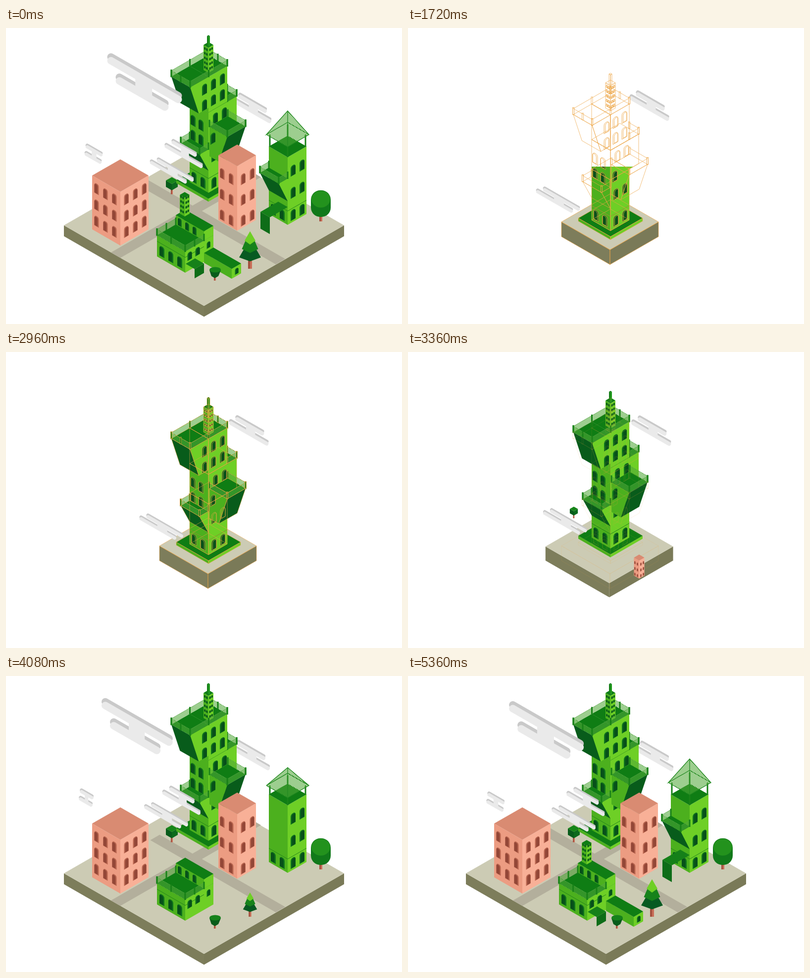
Animation of 800x600 px, one loop 5400 ms. Source, as an HTML page with a canvas:

```html
<!DOCTYPE html>
<html lang="en">
<head>
<meta charset="utf-8">
<title>Isometric city</title>
<style>
html, body { margin: 0; width: 100%; height: 100%; overflow: hidden; background: #fff; }
canvas { display: block; }
</style>
</head>
<body>
<canvas id="stage" width="800" height="600"></canvas>
<script>
const c = document.getElementById('stage').getContext('2d');
const LOOP = 5400, CUT = 640, K = 0.577, SIDES = [-1, 1];
const ROOF = '#0f7d14', DARK = '#085c1b', SEAM = '#23841a', LEAF = '#16821b';
const GREEN = [ROOF, '#4cb01e', '#6ecf26'];
const PINK = ['#d98b72', '#ec9c82', '#f8b097'];
const SAND = ['#cccbb4', '#7d7d5b', '#7a7a58'];
const GREEN_WIN = ['#10741c', '#07501a'], PINK_WIN = ['#b96650', '#934737'];
let now = 0, wire = false, winScale = 1;

const clamp = x => Math.max(0, Math.min(1, x));
const mix = (a, b, k) => a + (b - a) * k;
const lin = (start, span) => clamp((now - start) / span);
const out = (start, span) => 1 - (1 - lin(start, span)) ** 3;
const inOut = (start, span) => {
  const x = lin(start, span);
  return x < 0.5 ? 4 * x ** 3 : 1 - 4 * (1 - x) ** 3;
};

// Points are [x, y]. Side -1 is the left axis, 1 the right one.
const back = ([x, y], side, d) => [x + side * d, y - K * d];
const fore = ([x, y], side, d) => [x + side * d, y + K * d];
const up = ([x, y], h) => [x, y - h];
const rhomb = ([x, y], r) => [[x - r, y], [x, y + K * r], [x + r, y], [x, y - K * r]];

// Fine mesh used for railings and the glass roof
const mesh = (() => {
  const tile = document.createElement('canvas');
  tile.width = tile.height = 3;
  const g = tile.getContext('2d');
  g.fillStyle = 'rgba(90,175,60,.35)';
  g.fillRect(0, 0, 3, 3);
  g.fillStyle = '#4ca437';
  for (let i = 0; i < 3; i++) g.fillRect(i, i, 1, 1);
  return c.createPattern(tile, 'repeat');
})();

function paint(col) {
  if (wire) return c.stroke();
  c.fillStyle = col;
  c.fill();
}

function trace(pts) {
  c.beginPath();
  for (const p of pts) c.lineTo(...p);
}

function poly(col, ...pts) {
  trace(pts);
  c.closePath();
  paint(col);
}

function line(col, width, ...pts) {
  trace(pts);
  if (!wire) { c.strokeStyle = col; c.lineWidth = width; }
  c.stroke();
}

function oval(col, x, y, rx, ry) {
  c.fillStyle = col;
  c.beginPath();
  c.ellipse(x, y, rx, ry, 0, 0, 7);
  c.fill();
}

// Block standing on its front bottom corner p
function box(p, l, r, h, cols) {
  const top = up(p, h);
  for (const [side, len, col] of [[-1, l, cols[1]], [1, r, cols[2]]])
    poly(col, p, back(p, side, len), back(top, side, len), top);
  poly(cols[0], top, back(top, -1, l), back(back(top, -1, l), 1, r), back(top, 1, r));
}

function seam(p, l, r) { line(SEAM, 1, back(p, -1, l), p, back(p, 1, r)); }

function arch(a, h, w, ht, col) {
  const spring = h + ht - w / 2;
  c.beginPath();
  c.moveTo(a - w / 2, h);
  c.arc(a, spring, w / 2, Math.PI, 0, true);
  c.lineTo(a + w / 2, h);
  c.closePath();
  paint(col);
}

// Even grid of windows on the face that leaves corner p on one side
function wins(p, side, { at = 11, gap = 18, n = 2, low = 4, step = 32, rows = 1, w = 10, h = 21, cols = GREEN_WIN }) {
  if (winScale <= 0) return;
  c.save();
  c.transform(side, -K, 0, -1, ...p);
  const sw = w * winScale, sh = h * winScale;
  for (let i = 0; i < n; i++) for (let j = 0; j < rows; j++) {
    const a = at + gap * i, y = low + step * j;
    arch(a, y, sw, sh, cols[0]);
    arch(a + sw * 0.13, y + sh * 0.04, sw * 0.74, sh * 0.86, cols[1]);
  }
  c.restore();
}

function post([x, y], h) {
  if (wire) return c.strokeRect(x - 1.5, y - h, 3, h);
  c.fillStyle = '#198218';
  c.fillRect(x - 1.5, y - h, 3, h + 1);
}

// Railing along a path, each stretch split into n parts by posts
function fence(n, ...pts) {
  for (let i = 1; i < pts.length; i++) {
    const a = pts[i - 1], b = pts[i];
    if (!wire) poly(mesh, a, b, up(b, 12), up(a, 12));
    line('#55a544', 0.8, up(a, 12), up(b, 12));
    for (let j = 0; j <= n; j++) post([mix(a[0], b[0], j / n), mix(a[1], b[1], j / n)], 14);
  }
}

// Part leaning out of a wall; its underside reaches out by the taper share
function lean(p, side, len, reach, h, taper, k) {
  if (k <= 0) return;
  const e = reach * k, q = back(p, side, len), p2 = fore(p, side, e), q2 = fore(q, side, e);
  const foot = up(p, -h), p3 = fore(foot, side, taper * e), q3 = back(p3, side, len);
  poly(side < 0 ? GREEN[2] : GREEN[1], p, p2, p3, foot);
  poly(DARK, p2, q2, q3, p3);
  poly(ROOF, p, p2, q2, q);
}

function railing(p, side, len, reach, k) {
  const q = back(p, side, len);
  if (k > 0.95) fence(1, q, fore(q, side, reach), fore(p, side, reach), p);
}

function balcony(p, side, len, reach, h, taper, k) {
  lean(p, side, len, reach, h, taper, k);
  railing(p, side, len, reach, k);
}

// Flat roof with a hanging front panel
function awning(p, side, e, h) {
  if (e <= 0) return;
  const q = back(p, side, 19), p2 = fore(p, side, e), q2 = fore(q, side, e);
  poly('#158019', p, q, q2, p2);
  poly('#0e6d18', p2, q2, up(q2, -h), up(p2, -h));
}

function spire(p, h, rows) {
  box(p, 10, 10, h, GREEN);
  for (const s of SIDES) wins(p, s, { at: 3, gap: 4, low: 5, step: 9.5, rows, w: 3, h: 5 });
}

function slab() { box([409, 352], 65, 65, 6, GREEN); }

function tower(kLow, kTop, kRight, kMast) {
  const foot = [409, 334], mid = [409, 231], neck = [409, 171], top = [409, 99];
  box(foot, 38, 38, 103, GREEN);
  seam(up(foot, 29), 38, 38);
  wins(foot, -1, {});
  wins(foot, 1, { step: 54, rows: 2 });

  box(mid, 38, 57, 60, GREEN);
  seam(neck, 0, 57);
  const edge = back(neck, 1, 38), corner = back(neck, 1, 57);
  fence(1, edge, corner, back(corner, -1, 19));
  wins(mid, -1, { at: 15, gap: 16, low: -15, step: 30, rows: 2 });
  wins(mid, 1, { at: 14, low: 30 });
  balcony([409, 246], -1, 38, 18, 43, 0, kLow);
  balcony([411, 200], 1, 37, 36, 60, 0.53, kRight);
  wins(mid, 1, { at: 9, n: 1, low: -8 });

  // Top storeys under the roof terrace
  box(neck, 38, 38, 72, GREEN);
  lean(top, -1, 38, 37, 63, 0.53, kTop);
  wins([409, 162], 1, { at: -8, n: 3, low: 0, rows: 2 });
  const e = 37 * kTop, front = fore(top, -1, e), left = back(front, -1, 38), right = back(top, 1, 38);
  fence(2, left, [409, 55], right);
  spire([409, 91], 51, 5);
  if (kMast > 0) box([409, 38], 3, 3, 20 * kMast, [ROOF, '#168018', '#1f9a1c']);
  fence(2, left, front, right);
}

// Grows a drawing from its foot point
function pop(k, x, y, draw) {
  if (k <= 0) return;
  c.save();
  c.translate(x, y);
  c.scale(k, k);
  c.translate(-x, -y);
  draw();
  c.restore();
}

function pinkBlock(p, size, h, grid) {
  box(p, size, size, h, PINK);
  for (const s of SIDES) wins(p, s, { at: 12, rows: 3, w: 9, cols: PINK_WIN, ...grid });
}

const pinkSlim = () => pinkBlock([467, 411], 38, 131, { step: 42 });
const pinkWide = () => pinkBlock([231, 441], 57, 109, { n: 3, low: 11, step: 33 });

function lookout() {
  const p = [569, 399];
  box(p, 38, 38, mix(78, 137, out(3500, 420)), GREEN);
  seam(up(p, 28), 38, 38);
  winScale = out(3670, 400);
  wins(p, 1, { step: 45, rows: 3 });
  wins(p, -1, {});
  winScale = 1;
  balcony([569, 305], -1, 38, 18, 46, 0, out(4564, 400));
  awning([569, 363], -1, 36 * out(4450, 500), 34);

  const k = out(3950, 350);
  if (k <= 0) return;
  for (const q of rhomb([569, 240], 36)) post(q, 24 * k);
  const y = 240 - 24 * k, tip = [569, y - 48 * k], [l, f, r, b] = rhomb([569, y], 43);
  poly(mesh, l, f, r, tip);
  line('#238a22', 1.3, l, f, r, tip, l, b, r);
  line('#238a22', 1.3, f, tip);
}

function house() {
  const p = [362, 496], roof = up(p, 43);
  box(p, 57, 57, 43, GREEN);
  seam(up(p, 31), 57, 38);
  wins(p, -1, { n: 3, low: 5 });
  wins(p, 1, { at: 9, gap: 16, low: 21, w: 9, h: 16 });
  wins(p, 1, { at: 47, n: 1, low: 23, w: 7, h: 13 });

  const k = out(3730, 380), wing = back(roof, 1, 38);
  if (k > 0) {
    box(wing, 57, 19, 19 * k, GREEN);
    winScale = k;
    wins(wing, -1, { at: 19, gap: 15, n: 3, low: 1, w: 8, h: 16 });
    winScale = 1;
  }
  const rise = 38 * out(4490, 300);
  if (rise > 0) spire([361, 382], rise, Math.floor(rise / 9.5));
  if (now > 3950) fence(2, back(wing, -1, 57), back(roof, -1, 57), roof, wing);
  awning([363, 478], 1, 18 * out(4150, 350), 19);
}

function annex() {
  const len = 56 * out(4620, 400);
  if (len <= 0) return;
  const p = fore([400, 476], 1, len);
  box(p, len, 19, 20, GREEN);
  wins(p, 1, { at: 10, n: 1, w: 7, h: 12 });
}

function trunk(x, y, w, h) {
  c.fillStyle = '#c96f59';
  c.fillRect(x - w / 2, y - h, w, h);
  c.fillStyle = '#a4503f';
  c.fillRect(x - w / 2, y - h, w / 2, h);
}

function cubeTree() {
  trunk(335, 337, 4, 14);
  box([335, 329], 12, 12, 13, ['#168519', DARK, '#0c6a1d']);
}

function roundTree() {
  trunk(636, 392, 6, 16);
  c.fillStyle = '#11791a';
  c.beginPath();
  c.roundRect(616, 329, 40, 54, 19);
  c.fill();
  oval('#23921d', 636, 347, 19, 17);
}

function pine() {
  const x = 493;
  trunk(x, 488, 8, 18);
  ['#075a22', LEAF, '#6ecf26'].forEach((col, i) => {
    const y = 473 - 17 * i, w = 22 - 5.5 * i, n = i < 2 ? w / 2 : 0;
    poly(col, [x - n, y - 27], [x + n, y - 27], [x + w, y - 8], [x, y], [x - w, y - 8]);
  });
}

function bush() {
  trunk(422, 512, 4, 10);
  poly(DARK, [411, 491], [434, 491], [429, 503], [422, 507], [415, 503]);
  oval(LEAF, 422.5, 490, 11.5, 5.5);
}

// Strip of road that starts at the plate's edge and runs away along one axis
function road(p, side, len) {
  const q = back(p, -side, 19);
  if (len > 0) poly('#b3af9c', p, q, back(q, side, len), back(p, side, len));
}

// Two strips along the right-down axis, joined in the middle of their overlap
function cloud(k, speed, dy, w, upper, lower) {
  if (k <= 0) return;
  const s = (now - LOOP) / 1000 * speed;
  const strips = [upper, lower].map(([x, y, len]) => ({ p: [x, y], len: len * k }));
  const at = (strip, x) => fore(strip.p, 1, x - strip.p[0]);
  const start = Math.max(...strips.map(t => t.p[0]));
  const end = Math.min(...strips.map(t => t.p[0] + t.len));
  const a = mix(start, end, 0.35), b = mix(start, end, 0.72);
  c.save();
  c.translate(s, s * 0.56 + dy);
  c.lineCap = 'round';
  for (const [shift, col] of [[-0.22, '#c9c9c9'], [0.28, '#eaeaea']]) {
    c.save();
    c.translate(0, shift * w);
    for (const t of strips) line(col, w, t.p, fore(t.p, 1, t.len));
    if (shift > 0) poly(col, at(strips[0], a), at(strips[0], b), at(strips[1], b), at(strips[1], a));
    c.restore();
  }
  c.restore();
}

function base(p, grow) {
  const w = mix(98, 283, p) * grow, h = mix(30, 22, p);
  box([mix(408, 400, p), mix(393, 400, p) + K * w + h], w, w, h, SAND);
}

function wires(alpha, k) {
  c.save();
  c.globalAlpha = alpha;
  c.strokeStyle = '#eda545';
  c.lineWidth = 0.7;
  if (k < 1) c.setLineDash([300 * k, 300]);
  wire = true;
  base(0, 1);
  c.translate(0, 77);
  slab();
  poly('', ...rhomb([409, 312], 38));
  tower(1, 1, 1, 1);
  wire = false;
  c.restore();
}

function draw(time) {
  now = time % LOOP;
  if (now < CUT) now += LOOP;
  c.fillStyle = '#fff';
  c.fillRect(0, 0, 800, 600);

  const intro = out(CUT, 300), p = inOut(3133, 657), dy = 77 * (1 - p);
  cloud(intro, 2.3, 0, 8, [473, 137, 50], [460, 145, 72]);
  base(p, intro);
  road([231, 466], 1, 284 * out(3640, 420));
  road([545, 479], -1, 279 * out(3850, 420));
  pop(out(3267, 300), 335, 337, cubeTree);

  c.save();
  c.translate(0, dy);
  pop(out(800, 400), 409, 314, slab);
  const rise = lin(1100, 1430);
  if (rise > 0) {
    c.beginPath();
    c.rect(0, 350 - 336 * rise, 800, 600);
    c.clip();
    tower(out(2250, 400), out(2340, 460), out(2460, 400), out(2560, 300));
  }
  c.restore();

  const fade = 1 - lin(2850, 620);
  if (fade > 0) wires(fade, lin(CUT, 380));

  c.save();
  c.translate(0, dy);
  pop(out(3328, 320), 467, 389, pinkSlim);
  pop(out(3480, 400), 231, 408, pinkWide);
  pop(out(3450, 400), 569, 377, lookout);
  pop(out(3480, 400), 362, 463, house);
  annex();
  pop(out(3625, 350), 636, 391, roundTree);
  pop(out(3600, 330), 422, 512, bush);
  pop(out(3670, 1400), 493, 488, pine);
  c.restore();

  cloud(intro, 8.7, dy, 6.5, [308, 267, 68], [294, 271, 68]);
  cloud(out(3380, 320), 3.5, dy, 7, [338, 230, 44], [324, 238, 70]);
  cloud(out(3800, 450), 8.7, 0, 15, [212, 62, 136], [229, 103, 92]);
  cloud(out(3950, 350), 8.7, 0, 6.5, [164, 239, 28], [162, 254, 28]);
}

function frame() {
  draw(performance.now());
  requestAnimationFrame(frame);
}
frame();
</script>
</body>
</html>
```
